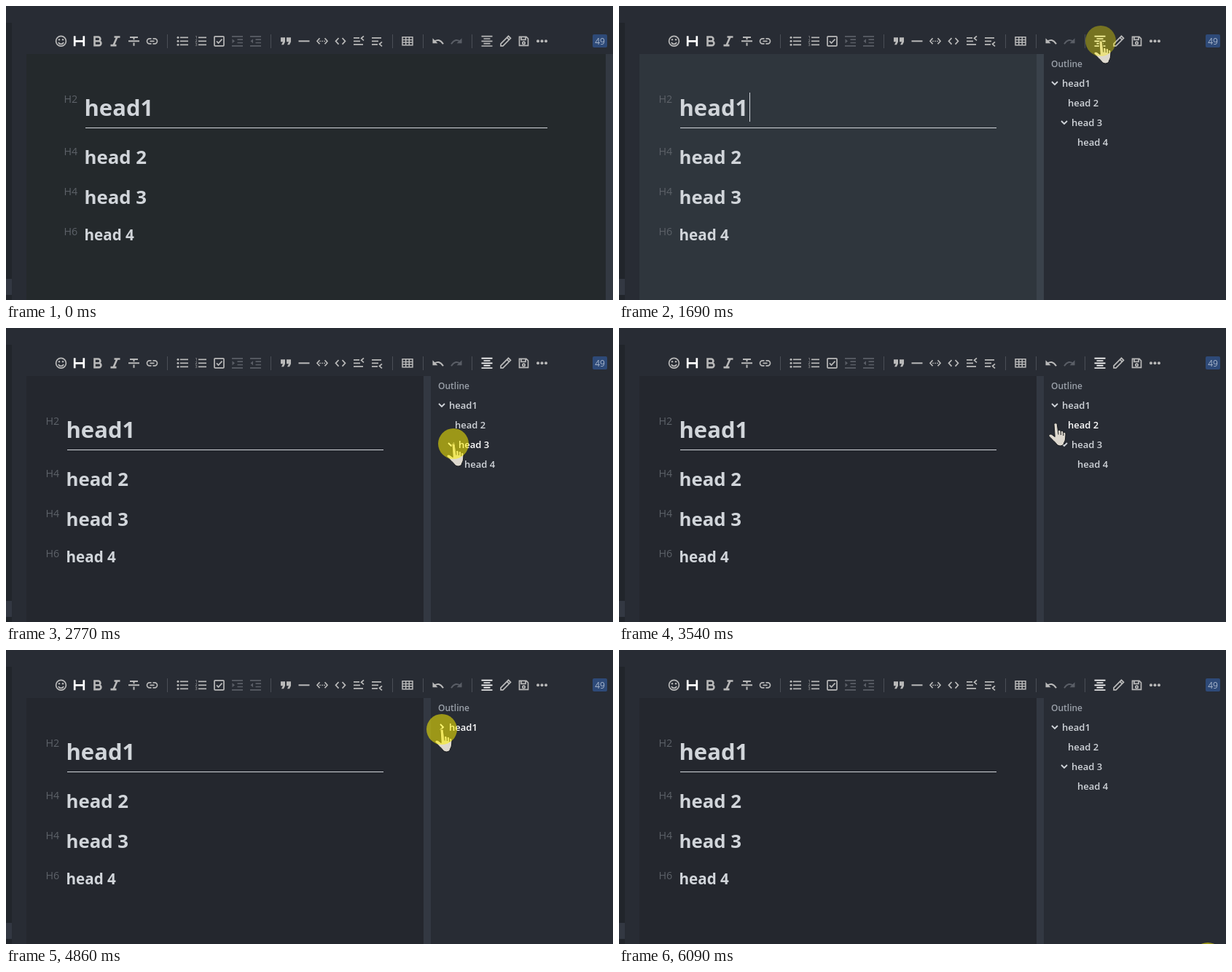
Write an HTML page that moves like this. It is 833x404 px and loops after 6250 ms.

```html
<!DOCTYPE html>
<html lang="en">
<head>
<meta charset="utf-8">
<title>Editor outline</title>
<style>
  html, body { margin: 0; width: 100%; height: 100%; overflow: hidden; background: #282c34; }
  svg { display: block; width: 833px; height: 404px; font-family: "Open Sans", "Noto Sans", sans-serif; }
  .heading { font-weight: 700; fill: #d1d5da; }
  .marker { font-size: 14.3px; fill: #5d6269; }
  .row { font-size: 13px; font-weight: 600; }
  .icon { fill: none; stroke: #b9b9b9; stroke-width: 1.7; color: #b9b9b9; }
  .icon.dim { stroke: #5a5e66; color: #5a5e66; }
  .icon.bright { stroke: #fff; color: #fff; }
  .solid { fill: currentColor; stroke: none; }
</style>
</head>
<body>
<svg id="stage" viewBox="0 0 833 404">
  <rect width="833" height="404" fill="#282c34"/>
  <rect y="23" width="8" height="381" fill="#21252b"/>
  <rect y="375" width="8" height="22" fill="#333842"/>
  <rect id="paper" x="28" y="66" height="338"/>
  <rect id="scrollbar" y="66" width="10" height="338"/>
  <g id="toolbar"></g>
  <rect x="805" y="39" width="20" height="18" rx="2" fill="#2e4a78"/>
  <text x="815" y="53" font-size="12" text-anchor="middle" fill="#a7b5ca">49</text>
  <g id="document">
    <path d="M109 167.5H743" id="rule" stroke="#d1d5da"/>
    <path d="M204.5 119V159" id="caret" stroke="#d1d5da"/>
  </g>
  <g id="panel">
    <text x="593" y="84" font-size="12" font-weight="600" fill="#9aa0a9">Outline</text>
  </g>
  <g id="tooltip">
    <rect x="625" y="1" width="51" height="25" rx="3" fill="#3b3e42"/>
    <path d="M656 26H666L661 31Z" fill="#3b3e42"/>
    <text x="650.3" y="17" font-size="10.5" font-weight="700" text-anchor="middle" fill="#fff"
      style="font-family:'Liberation Sans',Arial,sans-serif">Outline</text>
  </g>
  <g id="pointer">
    <g id="hand" stroke="#15171a" stroke-linejoin="round">
      <path fill="#ddd8ce" d="M-2 1.5C-2-.6 2-.8 2.3 1.5L3.4 10C5 8.8 7 9 7.2 11C8.5 9.8 10.5 10.3 10.7 12.5C12.5 11.6 14 12.6 14 15L13.6 21C13.3 25 11.5 26 11 29C9 31.5 4 31.5 2 29C-1 25-5 22-9 17.5C-9.4 15-6.5 14.2-4.5 15.8L-.8 18.5Z"/>
      <path fill="none" d="M3.4 10L4 15.5M7.2 11L7.4 16M10.7 12.5L10.8 17"/>
    </g>
    <circle id="click" r="21" fill="#fff200"/>
  </g>
</svg>
<script>
const LOOP = 6250, STEPS = 81;
const $ = id => document.getElementById(id);

function add(parent, tag, attrs, text = "") {
  const node = document.createElementNS("http://www.w3.org/2000/svg", tag);
  for (const key in attrs) node.setAttribute(key, attrs[key]);
  node.textContent = text;
  return parent.appendChild(node);
}

const set = (id, attrs) => {
  for (const key in attrs) $(id).setAttribute(key, attrs[key]);
};
const show = (node, on) => node.setAttribute("visibility", on ? "visible" : "hidden");

// Toolbar: each shape is centred on its own origin.
const path = (d, extra = "") => `<path d="${d}" ${extra}/>`;
const solid = d => path(d, 'class="solid"');
const dot = (x, y, r) => `<circle cx="${x}" cy="${y}" r="${r}" class="solid"/>`;
const digit = (y, n) => `<text x="-7.5" y="${y}" font-size="5.5" class="solid">${n}</text>`;
const shift = side => path("M-7.5-6.5H7.5M0-2.2H7.5M0 2.2H7.5M-7.5 6.5H7.5") +
  solid(side > 0 ? "M-7-3L-3.5 0L-7 3Z" : "M-3.5-3L-7 0L-3.5 3Z");
const quote = x => solid(`M${x}-5h6v6l-2 4h-3l2-4h-3z`);
const insert = side => `<g transform="scale(1 ${side})">` +
  path("M-7-4.5H1M-7 0H2M-7 4.5H6M7-7L3.5-4L7-1") + "</g>";
const turn = d => path(d, 'stroke-width="2"');

const icons = [
  [75.5, '<circle r="6.9"/>' + dot(-2.5, -2, 1.2) + dot(2.5, -2, 1.2) + path("M-3.7 1.8Q0 6.5 3.7 1.8")],
  [100.5, path("M-6.3-7V7M6.3-7V7M-6.3 0H6.3", 'stroke-width="2.7"'), "bright"],
  [125.5, path("M-4-5.8H1A2.9 2.9 0 0 1 1 0H-4ZM-4 0H2A2.9 2.9 0 0 1 2 5.8H-4Z", 'stroke-width="2.6"')],
  [150, path("M-1.5-5.8H6.5M-6.5 5.8H1.5M2.5-5.8L-2.5 5.8", 'stroke-width="2.6"')],
  [175.5, path("M-7.5 0H7.5M-5.5-5.2H5.5M0-5V-2M0 2.3V6.5", 'stroke-width="2"')],
  [200.5, path("M-1-3.5H-3.5A3.5 3.5 0 0 0-3.5 3.5H-1M1-3.5H3.5A3.5 3.5 0 0 1 3.5 3.5H1M-3 0H3")],
  [242, [-5, 0, 5].map(y => dot(-6, y, 1.5) + path(`M-3 ${y}H8`)).join("")],
  [267, [-5, 0, 5].map((y, i) => digit(y + 2, i + 1) + path(`M-3 ${y}H8`)).join("")],
  [292.5, '<rect x="-6.5" y="-6.5" width="13" height="13" rx="1"/>' + path("M-3.5 0L-1 2.7L4-2.7")],
  [317.5, shift(1), "dim"],
  [342.5, shift(-1), "dim"],
  [384, quote(-7) + quote(1)],
  [409, path("M-7.5 0H7.5", 'stroke-width="2"')],
  [434, path("M-3.5-4L-7 0L-3.5 4M3.5-4L7 0L3.5 4") + [-3, 0, 3].map(x => dot(x, 0, .9)).join("")],
  [459, path("M-2.5-4.3L-6.5 0L-2.5 4.3M2.5-4.3L6.5 0L2.5 4.3")],
  [484, insert(1)],
  [509, insert(-1)],
  [551, path("M-7-5.5H7V5.5H-7ZM-7-1.8H7M-7 1.8H7M-2.3-6V6M2.3-6V6", 'stroke-width="1.5"')],
  [593, turn("M-6 1Q1-5 7 4") + solid("M-7.5-4V3H-.5Z")],
  [618, turn("M6 1Q-1-5-7 4") + solid("M7.5-4V3H.5Z"), "dim"],
  [660, path("M-7.5-6.7H7.5M-4.5-3.3H4.5M-7.5 0H7.5M-4.5 3.3H4.5M-7.5 6.7H7.5")],
  [685.5, path("M-6.5 6.5V3.5L4-7L7-4L-3.5 6.5ZM2-5L5-2")],
  [710.5, path("M-6-6H3.5L6-3.5V6H-6ZM-3.5-5.5V-2H2.5V-5.5") + '<circle cy="2.5" r="1.7"/>'],
  [735.5, [-5.5, 0, 5.5].map(x => dot(x, 0, 2)).join("")]
].map(([x, shape, tone = ""]) => {
  const icon = add($("toolbar"), "g", { class: "icon " + tone, transform: `translate(${x} 48.3)` });
  icon.innerHTML = shape;
  return { x, icon };
});
const outlineIcon = icons.find(item => item.x === 660).icon;
for (const x of [221.5, 363.5, 530.5, 572.5, 639.5])
  add($("toolbar"), "path", { d: `M${x} 39V58`, stroke: "#4b4f57" });

for (const [text, y, size, marker, markerY] of [
  ["head1", 151, 31, "H2", 133],
  ["head 2", 217, 25.8, "H4", 205],
  ["head 3", 272, 25.8, "H4", 260],
  ["head 4", 322, 20.6, "H6", 315]
]) {
  add($("document"), "text", { x: 107.5, y, "font-size": size, class: "heading" }, text);
  add($("document"), "text", { x: 79.5, y: markerY, class: "marker" }, marker);
}

const rows = [["head1", 608, 598], ["head 2", 616], ["head 3", 621, 611], ["head 4", 629]]
  .map(([text, x, arrowX], i) => ({
    y: 106 + 27 * i,
    arrowX,
    label: add($("panel"), "text", { x, y: 111 + 27 * i, class: "row" }, text),
    arrow: arrowX && add($("panel"), "path",
      { d: "M-4-2L0 2L4-2", fill: "none", "stroke-width": 1.8 })
  }));

// Pointer keys: [step, x, y]
const route = [
  [7, 703, 93], [8, 692, 80], [9, 678, 64], [10, 668, 53], [11, 661, 48],
  [23, 661, 48], [24, 668, 75], [25, 685, 120], [26, 697, 155], [27, 683, 156],
  [28, 657, 150], [29, 645, 145], [30, 641, 145], [32, 624, 153], [34, 614, 159],
  [44, 614, 159], [46, 599, 131], [48, 594, 120], [51, 598, 109],
  [64, 598, 109], [65, 606, 117], [68, 700, 250], [71, 800, 379], [73, 804, 408], [79, 808, 423]
];
// Button presses: [down, up]
const presses = [[21, 22], [36, 37], [43, 44], [52, 54], [63, 64], [79, 81]];

function pointerAt(step) {
  const next = route.findIndex(key => key[0] > step);
  if (next < 0) return route.at(-1).slice(1);
  if (next === 0) return route[0].slice(1);
  const [s0, x0, y0] = route[next - 1], [s1, x1, y1] = route[next];
  const k = (step - s0) / (s1 - s0);
  return [x0 + (x1 - x0) * k, y0 + (y1 - y0) * k];
}

function pressAt(step) {
  const press = presses.findLast(([down]) => down <= step);
  if (!press) return 0;
  return step < press[1] ? 1 : Math.max(0, 1 - (step - press[1] + 1) / 3);
}

function draw(time) {
  const step = Math.min(STEPS - 1, Math.floor(time / LOOP * STEPS + .22));
  const between = (from, to) => step >= from && step < to;
  const open = step >= 22, focused = between(22, 28);
  const [x, y] = pointerAt(step);

  set("paper", { width: open ? 545 : 795, fill: focused ? "#2f363d" : open ? "#24272e" : "#24292c" });
  set("scrollbar", { x: open ? 573 : 823, fill: focused ? "#3a424b" : open ? "#333842" : "#333942" });
  set("document", { transform: `translate(${open ? -25 : 0} 0)` });
  set("rule", { d: `M109 167.5H${open ? 543 : 743}` });
  $("caret").style.display = focused ? "" : "none";
  $("panel").style.display = open ? "" : "none";
  outlineIcon.setAttribute("class", step >= 11 ? "icon bright" : "icon");
  set("tooltip", { opacity: between(11, 22) ? Math.min(1, (step - 10) / 3) : 0 });

  const closed = [between(54, 64), false, between(37, 44), false];
  rows.forEach((row, i) => {
    const visible = i === 0 || !closed[0] && !(i === 3 && closed[2]);
    const hovered = x > 583 && Math.abs(y - row.y) <= 13.5;
    const color = hovered ? "#fff" : "#d1d5da";
    show(row.label, visible);
    row.label.setAttribute("fill", color);
    if (!row.arrow) return;
    show(row.arrow, visible);
    row.arrow.setAttribute("stroke", color);
    row.arrow.setAttribute("transform", `translate(${row.arrowX} ${row.y}) rotate(${closed[i] ? -90 : 0})`);
  });

  set("pointer", { transform: `translate(${x} ${y})` });
  show($("hand"), between(7, 73));
  set("click", { opacity: .54 * pressAt(step) });
}

const start = performance.now();
function tick() {
  draw((performance.now() - start) % LOOP);
  requestAnimationFrame(tick);
}
tick();
</script>
</body>
</html>
```
